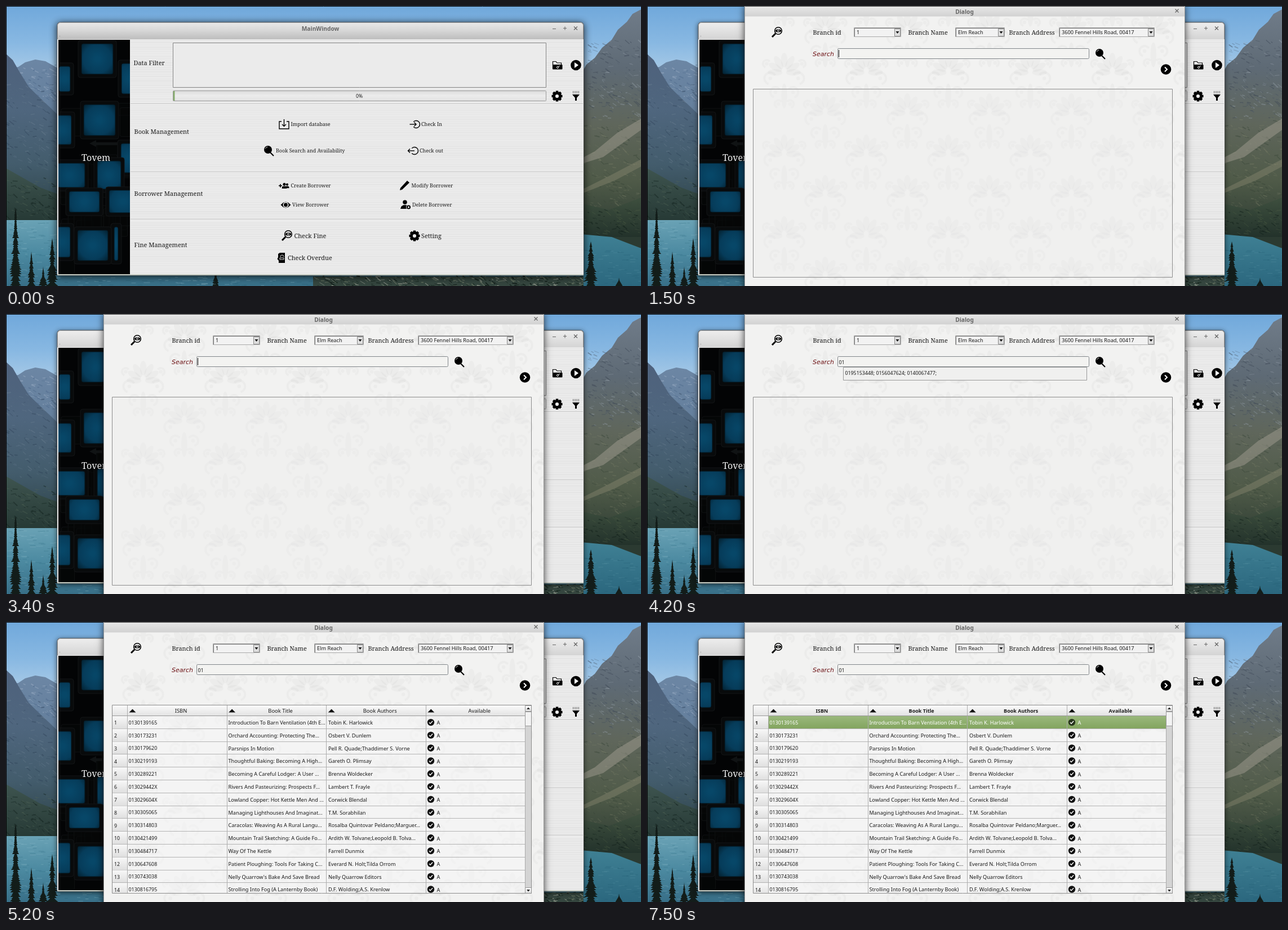
Recreate the animation shown at these times as an HTML page with a canvas. Size 1127x497 px, loop 8000 ms.

```html
<!DOCTYPE html>
<html lang="en">
<head>
<meta charset="utf-8">
<title>Library manager</title>
<style>
html, body { margin: 0; width: 100%; height: 100%; overflow: hidden; background: #000; }
canvas { display: block; }
</style>
</head>
<body>
<canvas id="stage" width="1127" height="497"></canvas>
<script>
const W = 1127, H = 497, LOOP = 8000;
const c = document.getElementById('stage').getContext('2d');
const SANS = '"Noto Sans", sans-serif', SERIF = '"Noto Serif", serif';
const CARET_FLIPS = [1500, 2000, 2500, 3000, 3400, 4200, 4600, 5100, 5500, 5900, 7100, 7500];
const BOOKS = `0130139165|Introduction To Barn Ventilation (4th E...|Tobin K. Harlowick
0130173231|Orchard Accounting: Protecting The...|Osbert V. Dunlem
0130179620|Parsnips In Motion|Pell R. Quade;Thaddimer S. Vorne
0130219193|Thoughtful Baking: Becoming A High...|Gareth O. Plimsay
0130289221|Becoming A Careful Lodger: A User ...|Brenna Woldecker
013029442X|Rivers And Pasteurizing: Prospects F...|Lambert T. Frayle
013029604X|Lowland Copper: Hot Kettle Men And ...|Corwick Blendal
0130305065|Managing Lighthouses And Imaginat...|T.M. Sorabhilan
0130314803|Caracolas: Weaving As A Rural Langu...|Rosalba Quintovar Peldano;Marguer...
0130421499|Mountain Trail Sketching: A Guide Fo...|Ardith W. Tolvane;Leopold B. Tolva...
0130484717|Way Of The Kettle|Farrell Dunmix
0130647608|Patient Ploughing: Tools For Taking C...|Everard N. Holt;Tilda Orrom
0130743038|Nelly Quarrow's Bake And Save Bread|Nelly Quarrow Editors
0130816795|Strolling Into Fog (A Lanternby Book)|D.F. Wolding;A.S. Krenlow`
  .split('\n').map(row => row.split('|'));

let seed = 1;
const rand = (a = 0, b = 1) => {
  seed = (seed * 16807) % 2147483647;
  return a + (b - a) * seed / 2147483647;
};

function rect(x, y, w, h, fill, stroke, radius = 0) {
  c.beginPath();
  c.roundRect(x, y, w, h, radius);
  if (fill) { c.fillStyle = fill; c.fill(); }
  if (stroke) { c.strokeStyle = stroke; c.lineWidth = 1; c.stroke(); }
}
function poly(fill, ...p) {
  c.beginPath();
  for (let i = 0; i < p.length; i += 2) c.lineTo(p[i], p[i + 1]);
  c.closePath();
  c.fillStyle = fill;
  c.fill();
}
function line(color, width, ...p) {
  c.beginPath();
  for (let i = 0; i < p.length; i += 2) c.lineTo(p[i], p[i + 1]);
  c.strokeStyle = color;
  c.lineWidth = width;
  c.stroke();
}
function disc(x, y, r, fill = '#000') {
  c.beginPath();
  c.arc(x, y, r, 0, 7);
  c.fillStyle = fill;
  c.fill();
}
function ring(x, y, r, width = 1.5, from = 0, to = 7, color = '#000') {
  c.beginPath();
  c.arc(x, y, r, from, to);
  c.strokeStyle = color;
  c.lineWidth = width;
  c.stroke();
}
function ramp(y0, y1, ...colors) {
  const g = c.createLinearGradient(0, y0, 0, y1);
  colors.forEach((color, i) => g.addColorStop(i / (colors.length - 1), color));
  return g;
}
// y is the middle of the capitals
function text(str, x, y, size, { font = SANS, style = '', color = '#1a1a1a', align = 'left' } = {}) {
  c.font = `${style} ${size}px ${font}`;
  c.fillStyle = color;
  c.textAlign = align;
  c.fillText(str, x, y + size * 0.36);
}
const serif = (str, x, y, size) => text(str, x, y, size, { font: SERIF });
function clipped(x, y, w, h, draw) {
  c.save();
  c.beginPath();
  c.rect(x, y, w, h);
  c.clip();
  draw();
  c.restore();
}
function at(x, y, draw) {
  c.save();
  c.translate(x, y);
  draw();
  c.restore();
}

// ---- wallpaper ----
function conifer(x, top, bottom, width, color = '#131d1a') {
  for (let y = top; y < bottom; y += 4) {
    const w = width * (0.15 + 0.85 * (y - top) / (bottom - top)) * rand(0.55, 1.15);
    poly(color, x, y - 4, x + w / 2, y + 6, x - w / 2, y + 6);
  }
}
function speckle(x, y, w, h, count, colors) {
  for (let i = 0; i < count; i++) {
    const px = rand(x, x + w), py = rand(y, y + h), len = rand(2, 9);
    line(colors[i % colors.length], rand(0.6, 2), px, py, px + len, py + len * rand(-0.2, 1));
  }
}
function ripples(x, y, w, h, count, colors) {
  for (let i = 0; i < count; i++) rect(rand(x, x + w), rand(y, y + h), rand(3, 12), 1, colors[i % colors.length]);
}
function wallpaper() {
  rect(0, 0, W, H, ramp(0, 130, '#70a8db', '#88b8e2', '#b0cfe8'));
  poly(ramp(95, 300, '#6c86a4', '#5b7793'), 0, 112, 22, 108, 34, 100, 52, 95, 70, 98, 95, 112, 95, 300, 0, 300);
  speckle(18, 105, 74, 60, 70, ['#9db0c580', '#4e698b80']);
  poly(ramp(85, 380, '#4e617c', '#4f667e', '#435c6c', '#2b4044'),
    0, 85, 12, 96, 24, 117, 40, 143, 55, 158, 95, 196, 95, 382, 0, 382);
  clipped(0, 130, 92, 245, () => speckle(-4, 140, 100, 150, 170, ['#7f92a440', '#2b3d5260', '#62778a40']));
  poly(ramp(285, 382, '#3f5550', '#263935'), 0, 288, 30, 305, 60, 322, 95, 335, 95, 382, 0, 382);
  speckle(0, 305, 92, 70, 110, ['#16262280', '#5669594d']);
  rect(0, 380, W, H - 380, ramp(380, H, '#6aa2b5', '#4c8aa1', '#386f88'));
  ripples(0, 384, 92, 110, 110, ['#93bfcc50', '#28627a50']);

  poly(ramp(10, 410, '#6f7b88', '#5e6a75', '#5f665b', '#4f5a48', '#2b3a31'),
    1015, 132, 1030, 104, 1045, 92, 1058, 74, 1075, 60, 1086, 42, 1102, 28, 1112, 14, W, 6, W, 430, 1015, 408);
  clipped(1025, 0, 102, 410, () => {
    speckle(1030, 60, 100, 140, 190, ['#98a2ad60', '#3b465480', '#4d596670']);
    speckle(1020, 200, 110, 170, 190, ['#868a7050', '#36443770', '#6d725b50']);
    poly('#a09c9080', W, 200, 1085, 225, 1045, 258, 1022, 270, 1022, 280, 1060, 268, W, 220);
    poly('#918c7660', W, 272, 1070, 302, 1022, 326, 1022, 333, 1080, 310, W, 285);
    poly(ramp(345, 420, '#3c4d3d', '#1f2e28'), 1020, 350, 1070, 362, W, 340, W, 430, 1020, 408);
    speckle(1020, 360, 110, 45, 80, ['#12201a80', '#55654a50']);
  });
  poly(ramp(405, H, '#3f8094', '#2b677e'), 1020, 405, 1075, 410, W, 430, W, H, 1020, H);
  ripples(1025, 432, 102, 60, 60, ['#5f9aa850', '#1f566c50']);

  conifer(17, 362, H, 25);
  conifer(45, 440, H, 18);
  conifer(82, 416, H, 24);
  conifer(66, 466, H, 18);
  conifer(1038, 422, H, 30);
  conifer(1088, 486, H, 24);
  conifer(372, 474, H, 26);
  ripples(92, 479, 450, 18, 90, ['#8db9c660', '#24586e60']);
  rect(545, 480, 480, 17, '#35463f');
  speckle(545, 478, 480, 19, 260, ['#15211c', '#5c6a5a', '#7b8479', '#22332b']);
  line('#000', 1, 0.5, H, 0.5, 0.5, W, 0.5);
}

// ---- icons ----
function magnifier(x, y) {
  disc(x - 1, y - 2, 7);
  line('#000', 2, x + 3, y + 3, x + 9, y + 9);
  ring(x - 1, y - 2, 5, 0.8, -2.8, -1.7, '#fff');
}
function eyeGlass(x, y) {
  ring(x + 2, y - 2, 6.3, 1.6);
  line('#000', 3, x - 3, y + 3, x - 9, y + 9);
  c.beginPath();
  c.ellipse(x + 2, y - 2, 5, 2.8, 0, 0, 7);
  c.fillStyle = '#000';
  c.fill();
  disc(x + 2, y - 2, 2, '#eee');
  disc(x + 2, y - 2, 1.1);
}
function gear(x, y) {
  for (let i = 0; i < 8; i++) at(x, y, () => {
    c.rotate(i * Math.PI / 4);
    poly('#000', -3, -6, -2, -9.5, 2, -9.5, 3, -6);
  });
  ring(x, y, 5.3, 4.4);
}
function person(x, y, s) {
  disc(x, y - 3 * s, 3 * s);
  c.beginPath();
  c.roundRect(x - 5 * s, y + s, 10 * s, 5 * s, [4 * s, 4 * s, 0, 0]);
  c.fill();
}
function arrowCircle(x, y, dir) {
  ring(x + 3, y, 6.5, 1.4, -2.4, 2.4);
  const tip = dir > 0 ? x + 3 : x - 8.5;
  line('#000', 1.4, x - 8.5, y, x + 3, y);
  line('#000', 1.4, tip - 3.5 * dir, y - 3.5, tip, y, tip - 3.5 * dir, y + 3.5);
}
function chevronButton(x, y) {
  disc(x, y, 9.3);
  line('#fff', 2, x - 2, y - 4, x + 2, y, x - 2, y + 4);
}
function checkMark(x, y, color = '#111') {
  disc(x, y, 6.2, color);
  line('#fff', 1.4, x - 3, y, x - 1, y + 2.3, x + 3.2, y - 2.4);
}
function toolIcons() {
  line('#000', 1.2, 970.5, 111, 970.5, 98.5, 976, 98.5, 978, 101, 985.5, 101, 985.5, 105);
  rect(970, 104, 17.5, 8.5, '#000', null, 1);
  ring(979, 109, 1.6, 1, 0, 7, '#eee');
  line('#eee', 1, 980, 108, 983, 106);
  disc(1011.5, 105, 9.3);
  poly('#fff', 1009, 100, 1009, 110, 1016, 105);
  gear(978, 160);
  poly('#000', 1005, 157, 1018, 157, 1013, 163, 1013, 168, 1010, 168, 1010, 163);
  for (let i = 0; i < 10; i++) rect(1006 + (i % 5) * 2.5, 151 + (i > 4) * 2.6, 1, 1.4, '#444');
}
function menuIcons() {
  line('#000', 1.4, 489, 205, 485, 205, 485, 218, 502, 218, 502, 205, 498, 205);
  line('#000', 1.4, 493.5, 201, 493.5, 213);
  line('#000', 1.4, 490, 210, 493.5, 213.5, 497, 210);
  arrowCircle(725, 210, 1);
  magnifier(466, 257);
  arrowCircle(722, 257, -1);
  line('#000', 1.6, 484, 319, 490, 319);
  line('#000', 1.6, 487, 316, 487, 322);
  person(499, 319, 0.7);
  person(494, 319, 0.85);
  poly('#000', 699, 327, 700, 323, 712, 310, 716, 313.5, 703, 326);
  poly('#000', 487.5, 353, 492, 349, 496.5, 347.5, 501, 349, 505.5, 353, 501, 357, 496.5, 358.5, 492, 357);
  ring(496.5, 353, 4.2, 1.6, 0, 7, '#eee');
  person(708, 352, 1.25);
  poly('#000', 702, 355, 714, 355, 714, 360, 700, 360);
  disc(714.5, 357, 4.5, '#eee');
  ring(714.5, 357, 2.6, 2);
  eyeGlass(499, 407);
  gear(725, 408);
  poly('#000', 483, 440, 486, 438, 495, 438, 495, 456, 484, 456, 484, 452, 481.5, 449, 483, 446);
  ring(490, 445, 3, 1, 3, 6.4, '#eee');
  rect(486, 447, 7, 3, null, '#ddd');
}

// ---- main window ----
function tile(x, y, w, h) {
  const glow = c.createRadialGradient(x + w / 2, y + h / 2, 4, x + w / 2, y + h / 2, Math.max(w, h) * 0.7);
  glow.addColorStop(0, '#074768');
  glow.addColorStop(0.6, '#063c5a');
  glow.addColorStop(1, '#03202f');
  rect(x - 6, y - 6, w + 12, h + 12, '#080a0b', '#131516', 4);
  rect(x, y, w, h, glow, '#04141d', 3);
}
function sidebar() {
  clipped(93, 60, 127, 416, () => {
    rect(93, 60, 127, 416, '#030405');
    for (let i = 0; i < 26; i++) rect(rand(80, 210), rand(50, 470), rand(20, 65), rand(20, 65), '#06080899', '#0f1112', 3);
    tile(94, 107, 20, 45);
    tile(134, 67, 56, 54);
    tile(205, 102, 30, 54);
    tile(85, 194, 31, 52);
    tile(138, 175, 56, 55);
    tile(204, 244, 30, 52);
    tile(162, 275, 42, 50);
    tile(85, 279, 55, 43);
    tile(112, 329, 54, 37);
    tile(183, 327, 50, 40);
    tile(85, 392, 29, 54);
    tile(192, 392, 7, 60);
    tile(127, 398, 54, 54);
    poly('#101314', 148, 244, 160, 238, 160, 242, 198, 242, 198, 247, 160, 247, 160, 250);
  });
  text('Tovem', 159.5, 269, 16, { font: SERIF, color: '#f4f4f4', align: 'center' });
}
function mainWindow(active, pressed) {
  c.save();
  c.shadowColor = active ? '#000c' : '#0009';
  c.shadowBlur = active ? 13 : 8;
  c.shadowOffsetY = 2;
  rect(91, 29, 934, 449, '#d8d8d8', '#555', [5, 5, 0, 0]);
  c.restore();
  rect(91.5, 29.5, 933, 30, active ? ramp(29, 59, '#e9e9e9', '#d6d6d6', '#bdbdbd') : ramp(29, 59, '#eee', '#d4d4d4'), '#999', [5, 5, 0, 0]);
  text('MainWindow', 558, 40.5, 10.2, { style: 'bold', color: '#666', align: 'center' });
  line('#777', 1.2, 970, 40.5, 976, 40.5);
  line('#777', 1.2, 989, 39.5, 995, 39.5);
  line('#777', 1.2, 992, 36.5, 992, 42.5);
  cross(1011, 39.5);
  rect(95, 53, 1, 1, '#888');
  rect(91, 59, 934, 418, '#e9e9e9');
  for (let y = 60; y < 476; y += 2) rect(221, y, 803, 2, `rgba(${y % 4 ? '255,255,255' : '190,190,190'},${rand(0, 0.12)})`);
  sidebar();
  for (const y of [173, 294, 378]) {
    rect(221, y, 803, 1, '#c3c3c3');
    rect(221, y + 1, 803, 1, '#f6f6f6');
  }
  rect(91, 476, 934, 2, '#c5cbc2');

  rect(296.5, 65.5, 662, 79, '#ebebeb', '#858585');
  rect(296.5, 150.5, 662, 18, ramp(150, 168, '#dadada', '#ececec', '#e2e2e2'), '#9a9a9a', 1);
  rect(297, 151, 2.5, 17, '#86ad6c');
  text('0%', 627, 159.5, 8.6, { align: 'center' });

  serif('Data Filter', 226.5, 101.5, 10.95);
  serif('Book Management', 227.5, 223, 10.95);
  serif('Borrower Management', 227.5, 333.5, 10.95);
  serif('Fine Management', 227.5, 424.5, 10.95);
  if (pressed) {
    rect(641.5, 244.5, 208, 24, '#e9e9e9', '#a9a9a9');
    line('#8a8a8a', 1, 642.5, 268, 642.5, 245.5, 849, 245.5);
  }
  serif('Import database', 505.5, 210, 8.95);
  serif('Check In', 737, 210, 8.95);
  serif('Book Search and Availability', 479, 257, 8.95);
  serif('Check out', 734, 257, 8.95);
  serif('Create Borrower', 505.5, 318.5, 8.95);
  serif('Modify Borrower', 719.5, 318.5, 8.95);
  serif('View Borrower', 508, 353, 8.95);
  serif('Delete Borrower', 721, 353, 8.95);
  serif('Check Fine', 511.5, 408, 10.9);
  serif('Setting', 737, 408, 10.9);
  serif('Check Overdue', 500, 447.5, 10.9);
  toolIcons();
  menuIcons();
}
function cross(x, y) {
  line('#666', 1.3, x - 3, y - 3, x + 3, y + 3);
  line('#666', 1.3, x + 3, y - 3, x - 3, y + 3);
}

// ---- dialog ----
function damask(x, y) {
  const ink = 'rgba(90,90,90,.035)';
  at(x, y, () => {
    c.scale(1.3, 1.3);
    c.fillStyle = ink;
    for (let i = -3; i <= 3; i++) at(0, 0, () => {
      c.rotate(i * 0.52);
      c.beginPath();
      c.ellipse(0, -17 + Math.abs(i) * 1.5, 4.5, 10, 0, 0, 7);
      c.fill();
    });
    for (const side of [-1, 1]) {
      for (const [px, py, r] of [[19, 8, 8], [12, 27, 7], [24, -12, 5], [8, 43, 5]]) {
        ring(px * side, py, r, 3, side > 0 ? -2.5 : -4.4, side > 0 ? 1.3 : -0.6, ink);
        disc(px * side, py, 2.5, ink);
      }
    }
    c.beginPath();
    c.ellipse(0, 32, 4, 17, 0, 0, 7);
    c.fillStyle = ink;
    c.fill();
  });
}
function combo(x, w, label) {
  rect(x + 0.5, 38.5, w - 1, 16, '#f2f2f2', '#aaa');
  line('#777', 1, x + 1.5, 54, x + 1.5, 39.5, x + w - 1, 39.5);
  rect(x + w - 11.5, 40.5, 10, 13, '#dedede', '#8c8c8c');
  poly('#111', x + w - 9.5, 45, x + w - 3.5, 45, x + w - 6.5, 49);
  text(label, x + 5, 47, 9.2);
}
function scrollButton(y, dir) {
  rect(921.5, y, 11, 10, ramp(y, y + 10, '#fff', '#ddd'), '#999');
  poly('#222', 924, y + 5 + dir * -1.5, 930, y + 5 + dir * -1.5, 927, y + 5 + dir * 2);
}
function table(selected, hover) {
  const step = 22.8, top = 167, style = selected ? 'bold' : '';
  rect(189, 148, 744, 334, '#f8f8f880');
  clipped(189, 148, 733, 334, () => {
    rect(189, 148, 733, 19, ramp(148, 167, '#fafafa', '#e2e2e2'));
    rect(189, 167, 26.5, 316, '#ebebeb');
    if (hover) rect(746, 149, 175, 17, '#fff');
    if (selected) rect(215, top, 706, step, ramp(top, top + step, '#9ab87c', '#82a45e'));
    BOOKS.forEach(([isbn, title, authors], i) => {
      const y = top + i * step, mid = y + 11.6, lit = selected && !i;
      const color = lit ? '#fff' : '#1a1a1a';
      rect(189, y, 26, step, ramp(y, y + step, '#f8f8f8', '#dedede'));
      text(i + 1, 192, mid + 0.5, 8.8, { style: lit ? 'bold' : '' });
      text(isbn, 217.5, mid, 8.9, { color });
      text(title, 394.5, mid, 9.2, { color });
      text(authors, 572, mid, 9.2, { color });
      checkMark(754, mid - 0.5, lit ? '#26331c' : '#111');
      text('A', 764.5, mid + 0.5, 9.2, { color });
      line('#b4b4b4', 1, 189, Math.round(y + step) - 0.5, 921, Math.round(y + step) - 0.5);
    });
    ['ISBN', 'Book Title', 'Book Authors', 'Available'].forEach((name, i) => {
      const x = 215.5 + i * 176.6;
      line('#adadad', 1, Math.floor(x) + 0.5, 148, Math.floor(x) + 0.5, 482);
      poly('#111', x + 3, 160.5, x + 15, 160.5, x + 9, 154.5);
      text(name, x + 95, 157.5, selected ? 9 : 9.4, { style, align: 'center' });
    });
    line('#999', 1, 189, 166.5, 921, 166.5);
  });
  rect(921.5, 148.5, 11, 333, '#d4d4d4', '#aaa');
  scrollButton(148.5, -1);
  scrollButton(471.5, 1);
  rect(921.5, 159.5, 11, 25, '#f3f3f3', '#999');
}
function dialog(s) {
  c.save();
  c.shadowColor = '#000b';
  c.shadowBlur = 12;
  rect(173, 0, 782, H + 20, '#f2f2f1');
  c.restore();
  clipped(173, 18, 782, H, () => {
    for (let i = 0; i < 11; i++)
      for (let y = (i % 2 ? 45 : -27); y < 560; y += 145) damask(245 + (i - 0.02) * 72.8, y);
  });
  rect(173, 0.5, 782, 18, ramp(0, 18, '#e8e8e8', '#d2d2d2'));
  line('#333', 1, 173, 0.5, 955, 0.5);
  line('#9a9a9a', 1, 173.5, 0, 173.5, H);
  line('#9a9a9a', 1, 954.5, 0, 954.5, H);
  text('Dialog', 563.5, 10, 10.2, { style: 'bold', color: '#666', align: 'center' });
  cross(940.5, 8.5);

  eyeGlass(231, 46);
  serif('Branch id', 294.5, 47.5, 10.8);
  serif('Branch Name', 463.5, 47.5, 10.8);
  serif('Branch Address', 642.5, 47.5, 10.8);
  combo(367, 84, '1');
  combo(547, 88, 'Elm Reach');
  combo(731, 170, '3600 Fennel Hills Road, 00417');
  text('Search', 294, 85.5, 11, { font: '"DejaVu Sans", sans-serif', style: 'italic', color: '#6b0f12' });
  rect(338.5, 75.5, 446, 18, '#f3f3f1', '#81868a', 2);
  text(s.typed, 340.5, 85.5, 8.9);
  if (s.caret) rect(340 + 5 * s.typed.length, 78, 1, 13, '#000');
  magnifier(804, 85);
  chevronButton(921, 112.5);

  if (s.results) table(s.selected, s.hover);
  rect(188.5, 147.5, 744, 334, s.results ? null : '#ececec66', '#8d8d8d');
  if (s.popup) {
    rect(348.5, 94.5, 432, 23, '#f0f0ef', '#999');
    text('0195153448; 0156047624; 0140067477;', 351.5, 105, 8.8);
  }
}

// ---- timeline ----
const stateAt = t => ({
  pressed: t >= 1400 && t < 1500,
  open: t >= 1500,
  caret: CARET_FLIPS.filter(flip => flip <= t).length % 2 === 1,
  typed: t < 3500 ? '' : t < 3600 ? '0' : '01',
  popup: t >= 3500 && t < 5200,
  results: t >= 5200,
  hover: t >= 5400 && t < 5500,
  selected: t >= 6200
});
function render(s) {
  seed = 7;
  wallpaper();
  mainWindow(!s.open, s.pressed);
  if (s.open) dialog(s);
}
let shown = '';
function tick() {
  const s = stateAt(performance.now() % LOOP), key = JSON.stringify(s);
  if (key !== shown) {
    render(s);
    shown = key;
  }
  requestAnimationFrame(tick);
}
tick();
</script>
</body>
</html>
```
